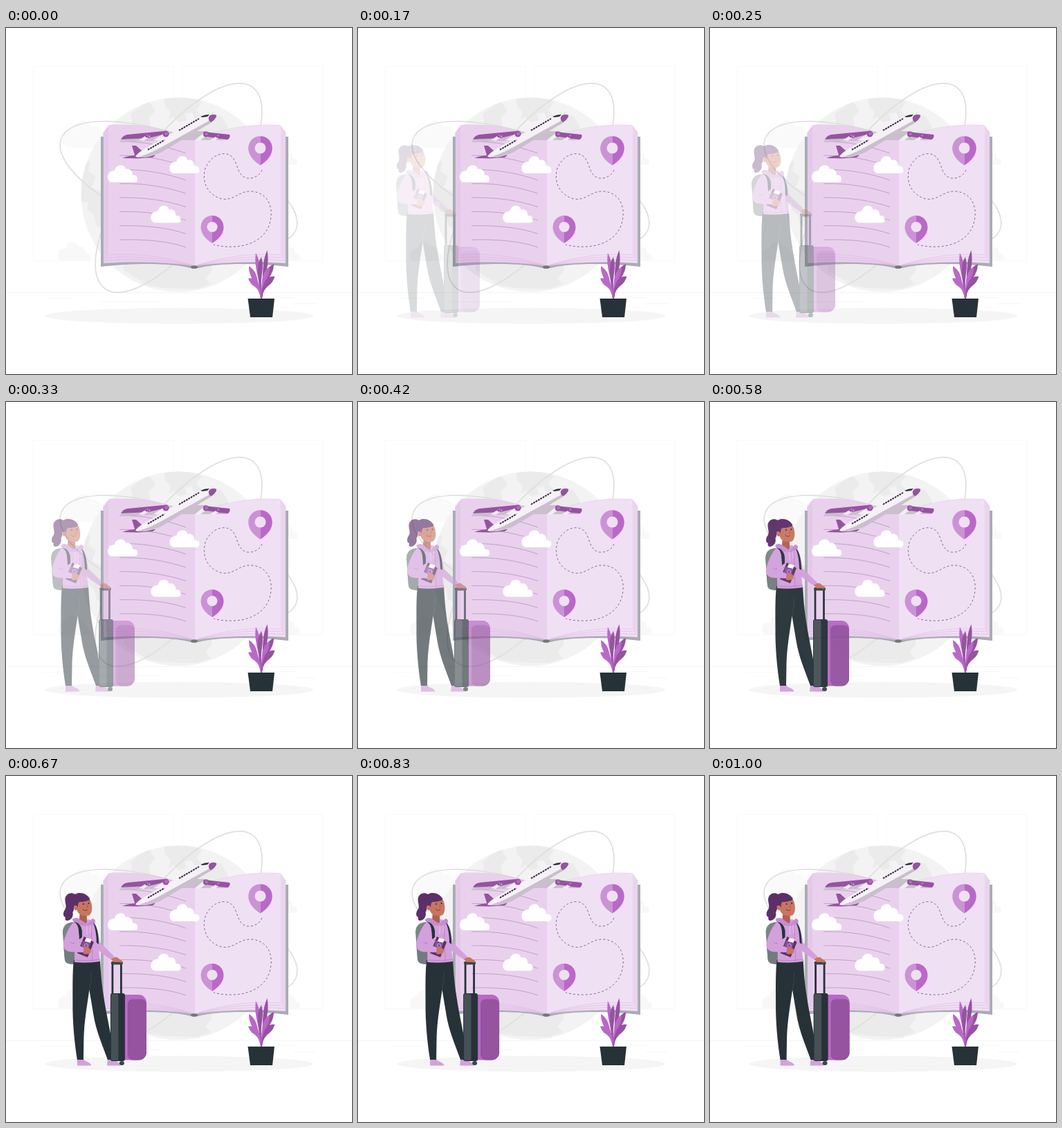
Recreate the animation shown at these times as an HTML page with a canvas. Size 500x500 px, loop 1040 ms.

```html
<!DOCTYPE html>
<html lang="en">
<head>
<meta charset="utf-8">
<title>Travel guide</title>
<style>
html, body { margin: 0; width: 100%; height: 100%; overflow: hidden; background: #fff; }
canvas { display: block; width: 500px; height: 500px; }
</style>
</head>
<body>
<canvas id="stage" width="500" height="500"></canvas>
<script>
const LOOP = 1040, STEP = 1000 / 24;
const DARK = '#263238', PURPLE = '#9553a0', ORCHID = '#ba68c8', LILAC = '#d3a0dc';
const HAIR = '#5c2f68', SKIN = '#c87561';

const stage = document.getElementById('stage').getContext('2d');
const makeLayer = () => {
  const c = document.createElement('canvas');
  c.width = c.height = 500;
  return c.getContext('2d');
};
const scene = makeLayer(), actor = makeLayer();
let g = scene;

function fill(d, color) {
  g.fillStyle = color;
  g.fill(new Path2D(d));
}
function line(d, color, w = 1, dash = []) {
  g.strokeStyle = color;
  g.lineWidth = w;
  g.setLineDash(dash);
  g.stroke(new Path2D(d));
  g.setLineDash([]);
}
function oval(x, y, rx, ry, color) {
  g.fillStyle = color;
  g.beginPath();
  g.ellipse(x, y, rx, ry, 0, 0, Math.PI * 2);
  g.fill();
}
function box(x, y, w, h, color, r = 0) {
  g.fillStyle = color;
  g.beginPath();
  g.roundRect(x, y, w, h, r);
  g.fill();
}
function at(x, y, sx, sy, draw) {
  g.save();
  g.translate(x, y);
  g.scale(sx, sy);
  draw();
  g.restore();
}

function cloud(x, y, s, color) {
  at(x, y, s, s, () => fill('M6 25C-2 25-2 10 6 9C8 8 9 8 10 8C11-1 24-3 26 6C31 4 36 8 36 15C41 14 43 17 43 21C43 24 41 25 38 25Z', color));
}

function orbit(x, y, a, b, deg) {
  g.strokeStyle = '#dfdfdf';
  g.lineWidth = 1.7;
  g.beginPath();
  g.ellipse(x, y, a, b, deg * Math.PI / 180, 0, Math.PI * 2);
  g.stroke();
}

function backdrop() {
  box(0, 0, 500, 500, '#fff');
  for (const x of [39.5, 255]) line(`M${x} 55.5h203v281h-203z`, '#f9f9f9');
  box(0, 382, 500, 1, '#f4f4f4');
  for (const [x, y, w] of [[52, 390, 45], [135, 395, 90], [388, 389, 30], [416, 398, 32]]) box(x, y, w, .6, '#f2f2f2');
  cloud(82, 133, 1.6, '#fafafa');
  cloud(75, 309, 1.12, '#f8f8f8');
  cloud(380, 174, .95, '#f8f8f8');
  cloud(382, 311, 1, '#f8f8f8');
  oval(250, 416, 194, 11.5, '#f5f5f5');
}

function globe() {
  g.save();
  g.beginPath();
  g.arc(249, 241, 140.5, 0, Math.PI * 2);
  g.clip();
  box(100, 95, 300, 300, '#f3f3f3');
  const land = '#ebebeb';
  fill('M180 124L194 113L207 107L216 119L206 130L209 143H184Z', land);
  fill('M228 100L276 100L283 108L275 118L283 127L274 131L268 122L258 124L262 133L250 136L242 128L235 133L238 122L230 113Z', land);
  fill('M274 140L288 130L298 122L312 128L320 141V152H272Z', land);
  fill('M105 200L122 192L119 207L130 214L124 230L140 238V290L131 286L127 270L117 262L119 252L105 250Z', land);
  fill('M170 338H298L297 352L288 362L296 370L278 377L228 376L205 372L182 358L170 350Z', land);
  g.restore();
  orbit(249.5, 231, 180.5, 69, -53.7);
  orbit(249.5, 225.5, 182, 67, 21.2);
}

function halfBook(paper, edge) {
  fill('M137 157H145V336H272.5V347H267C240 340 190 339 137 345Z', '#a6adb1');
  for (let i = 0; i < 4; i++) {
    const x = 141 + i * 2.3, top = 150 - i * 3, low = 340 - i * 4;
    const d = `M${x} ${top}C185 ${top - 4} 235 ${top + 5} 272.5 161V344C243 ${low / 2 + 170} 200 ${low - 4} ${x} ${low}Z`;
    fill(d, paper);
    line(d, edge, .6);
  }
  fill('M148 141C185 137 235 146 272.5 161V343.5C243 333 200 324 148 327.5Z', paper);
}

function pin(x, y, r, tip) {
  const d = s => `M${x} ${y - r}A${r} ${r} 0 0 ${s} ${x + (s ? r : -r)} ${y}Q${x + (s ? r : -r)} ${y + r * .8} ${x} ${tip}Z`;
  fill(d(0), '#cb92d6');
  fill(d(1), ORCHID);
  oval(x, y, r * .46, r * .46, '#f0e0f4');
}

function book() {
  halfBook('#e9d1ed', '#d9b3df');
  at(545, 0, -1, 1, () => halfBook('#f0e0f4', '#d9b3df'));
  oval(272, 345.5, 5, 2.3, '#6f777b');
  for (let i = 0; i < 8; i++) {
    const a = 164 + 20.3 * i, b = 181 + 19.4 * i;
    line(`M164 ${a}C200 ${a - 1} 234 ${b - 9} 260 ${b}`, '#bb9bc3', .9);
  }
  line('M370 205C366 216 350 221 342 214C332 206 335 189 322 183C310 178 294 187 288 203C283 220 289 241 312 247C330 250 336 235 355 236C378 238 388 258 381 283C372 312 335 322 300 313', '#866b90', 1, [3, 3]);
  pin(367.5, 173.5, 17.3, 198.5);
  pin(298, 287.5, 16.5, 311);
  cloud(147, 198, 1, '#fff');
  cloud(236.5, 185, 1, '#fff');
  cloud(209.5, 256.5, 1, '#fff');
}

function plane() {
  const grey = '#cabfcc';
  // far and near wings
  fill('M165 162L183 160L232 151L250 150L228 163L168 164Z', grey);
  fill('M166 161Q169 155 176 154L228 149L235 152L206 159Z', PURPLE);
  fill('M192 162L203 155L209 156L199 163ZM213 162L227 153L232 156L222 163Z', '#f3ecf4');
  fill('M245 162L272 149L288 149L322 157L320 162Z', grey);
  fill('M285 150L323 154Q325 157 321 161L309 160L290 157Z', PURPLE);
  fill('M273 162L284 153L289 156L280 163ZM295 162L303 157L307 159L302 163Z', '#f3ecf4');
  // tail and fuselage
  fill('M168 188Q178 184 190 184L216 184L212 187L190 188.5Z', PURPLE);
  fill('M182 170L188 170L200 181L187 187Z', PURPLE);
  fill('M187 186C190 180 200 175 210 169L278 129C287 125 297 124 303 126C305 129 302 133 297 136L222 180C207 187 195 188 187 186Z', '#f6f0f7');
  fill('M190 186.5C204 183 218 176 232 168L299 131C300 134 298 136 296 137L224 180C208 187 198 188 190 186.5Z', grey);
  fill('M293 129Q294 125 300 125Q305 125 304 128Q302 133 296 136Q292 134 293 129Z', PURPLE);
  fill('M281 128Q287 125 294 125L291 128L284 129Z', DARK);
  line('M205 176L229 162M250 148L279 131', '#332439', 2, [2.7, 1.2]);
  for (const [x, y, r] of [[204, 155.5, 3], [231, 153, 4.5], [289, 153.5, 4], [306, 155.5, 3.2]]) {
    oval(x, y, r, r, PURPLE);
    oval(x + .6, y - .4, r * .55, r * .6, ORCHID);
  }
}

// A spoon-shaped leaf: thin stem, widest near the tip
function leaf(tx, ty, cx, cy, w, color) {
  const left = [], right = [];
  for (let i = 0; i <= 24; i++) {
    const t = i / 24, u = 1 - t;
    const x = u * u * 369 + 2 * u * t * cx + t * t * tx;
    const y = u * u * 391 + 2 * u * t * cy + t * t * ty;
    const dx = u * (cx - 369) + t * (tx - cx), dy = u * (cy - 391) + t * (ty - cy);
    const r = (w * Math.sin(Math.PI * t ** 2.2) + .9 * u) / Math.hypot(dx, dy);
    left.push([x + dy * r, y - dx * r]);
    right.unshift([x - dy * r, y + dx * r]);
  }
  fill('M' + left.concat(right).join('L') + 'Z', color);
}

function plant() {
  leaf(377.5, 321, 373, 358, 2.8, PURPLE);
  leaf(361, 325, 367, 360, 2.8, ORCHID);
  leaf(369, 331, 365, 358, 3.2, PURPLE);
  leaf(351, 344, 363, 366, 3.6, ORCHID);
  leaf(387, 341, 374, 360, 3.8, PURPLE);
  leaf(381, 345, 370, 365, 3.2, ORCHID);
  leaf(350, 362, 367, 370, 4.2, ORCHID);
  leaf(388.5, 359, 371, 370, 4.2, PURPLE);
  fill('M349.5 391H388L385 418H353Z', DARK);
}

function suitcase() {
  line('M155 316V270H167.5V316', DARK, 2.8);
  box(153, 268, 17, 4.5, '#37444a', 2);
  oval(168.5, 415, 3.5, 3, '#37444a');
  box(160, 316, 44, 94.5, ORCHID, 11);
  box(177, 322.5, 27, 88, PURPLE, [7, 7, 11, 8]);
  box(152, 314, 21, 98, DARK, 3);
  box(153, 315, 10.5, 96, '#465156', 2);
}

function head() {
  fill('M108 194L118 199L118 212L110 216L107 207Z', '#b0604f');
  fill('M102 184C102 175 121 173 124 182C126 189 126 197 122 201C115 204 106 201 104 195Z', SKIN);
  fill('M122.5 178C118 169 107 167 101 171C95 167 88 170 86.5 177C86 183 89 187 87 192C83 197 83 203 87 204C86 207 87 209 90 209C96 208 99 202 97.5 197C100 193 99 190 101 187L104 192C106 189 104 185 107 182C113 182 119 181 122.5 178Z', HAIR);
  fill('M101 194C97 190 99 185 104 188L106 194Z', SKIN);
  oval(113, 185, .9, 1.2, DARK);
  oval(120.5, 184, .9, 1.2, DARK);
  line('M111 181.5Q113 179.5 115 180.5M119 180Q121 179 122.5 180', HAIR, .8);
  line('M117.5 185L119.5 189.5L117 190', '#a85444', .7);
  line('M111.5 192Q115 196 119 193', '#7f3434', .9);
}

function traveller() {
  // backpack and shoes
  fill('M100 211C89 211 83 216 83 226L86 265C87 271 91 272 103 272Z', '#7c8488');
  fill('M84 242L86 265C87 271 91 272 103 272V248Z', '#737b7f');
  line('M85 246Q93 250 101 249', '#566065', .8);
  fill('M104 409H113C115 413 122 413 124 417V418.5H104Z', LILAC);
  fill('M148 409H157C159 413 165 413 167 417V418.5H147Z', LILAC);
  // trousers
  fill('M99 266H137C138 282 139 298 142 317C146 345 155 382 158.5 410H148C141 390 131 368 127.500 345L121.5 309C118 333 114 356 113.500 378L113 410H104C100 386 97 353 97.500 327C97.500 305 97 284 99 266Z', DARK);
  line('M121.5 309Q125 296 124 282', '#3c484e', .8);
  // right arm
  fill('M154 264Q160 260 164 264L169 268Q168 271 164 269L158 270Z', SKIN);
  fill('M127 211C133 215 135 230 137 241L158 261L154 266C145 260 138 255 132 250Z', LILAC);
  // hoodie
  fill('M101 209C110 206 122 206 128 210C132 219 133 230 134 241L137 268Q119 271 100 269C101 252 99 238 98 225Z', LILAC);
  line('M124 215L126 268M101 266Q119 268 137 265', '#b27dbd', .8);
  head();
  fill('M97 208C99 204 105 204 109 208L118 214L126 206C132 207 131 213 126 215L119 217C111 216 100 215 97 208Z', '#c68bd1');
  line('M118 216V229M123 215V227', '#ead0ee', .8);
  fill('M99 211C106 211 110 217 111 224V233L107 236C107 225 105 216 99 211Z', DARK);
  fill('M127 212C131 214 135 225 135 243L132 241C132 229 130 219 127 212Z', DARK);
  // documents and left arm
  fill('M114 232L128 240L119 262L104 256Z', HAIR);
  fill('M117 234L125 236L122 243L114 240Z', '#fff');
  fill('M112 238L123 241L119 257L108 252Z', '#8a4f98');
  g.strokeStyle = LILAC;
  g.lineWidth = 1;
  g.beginPath();
  g.arc(117, 245, 2.6, 0, Math.PI * 2);
  g.stroke();
  fill('M112 249L118 247Q124 249 124 254Q121 259 113 257Z', SKIN);
  fill('M99 211C92 217 86 232 84 242C83 249 87 253 94 254L113 255L114 248L98 242L106 230C107 221 105 213 99 211Z', LILAC);
  line('M98 242L94 240M113 255L114 248', '#b27dbd', .8);
}

function shift(k) {
  if (k < 14.4) return -33 + 2.5 * (k - 2);
  return -2.4 + 2.6 * Math.sin(Math.PI * (k - 14.4) / 9.6);
}

function frame(now) {
  const t = now % LOOP;
  const k = Math.floor((t + 5) / STEP);
  const alpha = Math.max(0, Math.min(1, (k - 1.9) / 12.6));
  stage.globalAlpha = 1;
  stage.drawImage(scene.canvas, 0, 0);
  if (alpha > 0) {
    g = actor;
    g.clearRect(0, 0, 500, 500);
    at(shift(k), 0, 1, 1, () => {
      traveller();
      suitcase();
      fill('M153 265Q160 259 164 264L169 267Q169 271 165 269L157 269Z', SKIN);
    });
    stage.globalAlpha = alpha;
    stage.drawImage(actor.canvas, 0, 0);
  }
}

backdrop();
globe();
book();
plane();
plant();

const start = performance.now();
function tick() {
  frame(performance.now() - start);
  requestAnimationFrame(tick);
}
tick();
</script>
</body>
</html>
```
